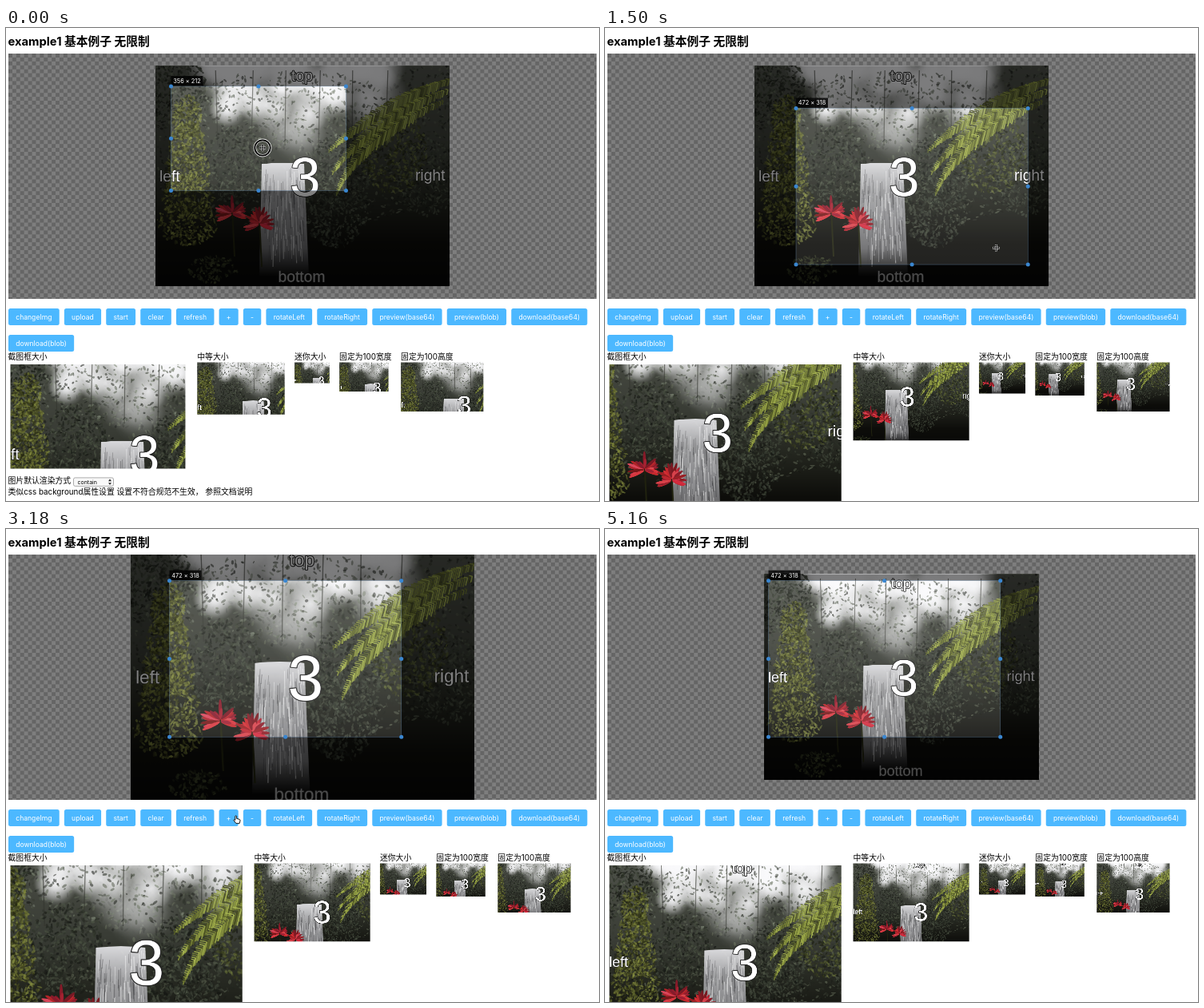
These frames come from a looping animation (742 by 592 pixels, 5220 ms). An HTML page with a canvas:

```html
<!DOCTYPE html>
<html lang="zh-CN">
<head>
<meta charset="utf-8">
<style>
html, body { margin: 0; width: 100%; height: 100%; overflow: hidden; background: #fff; }
canvas { display: block; }
</style>
</head>
<body>
<canvas id="stage" width="742" height="592"></canvas>
<script>
const LOOP = 5220, STEP = 60, SCALE = 0.615;
const VIEW = { x: 3, y: 32, w: 736, h: 307 };
const PHOTO = { w: 368, h: 276 };
const SANS = 'Inter, "Noto Sans CJK SC", "Noto Sans CJK", sans-serif';
const ctx = document.getElementById('stage').getContext('2d');

let seed = 11;
const rnd = () => (seed = (seed * 16807) % 2147483647) / 2147483647;
const between = (a, b) => a + (b - a) * rnd();
const clamp = (v, lo, hi) => Math.min(hi, Math.max(lo, v));

function layer(w, h, k, paint) {
  const c = document.createElement('canvas');
  c.width = w * k;
  c.height = h * k;
  const g = c.getContext('2d');
  g.scale(k, k);
  paint(g);
  return c;
}

function text(g, s, x, y, size, color = '#000', weight = 400, align = 'left') {
  g.font = `${weight} ${size}px ${SANS}`;
  g.fillStyle = color;
  g.textAlign = align;
  g.fillText(s, x, y);
}

function roundBox(g, x, y, w, h, r, fill, stroke) {
  g.beginPath();
  g.roundRect(x, y, w, h, r);
  g.fillStyle = fill;
  g.fill();
  if (stroke) {
    g.strokeStyle = stroke;
    g.stroke();
  }
}

function clipTo(g, r) {
  g.save();
  g.beginPath();
  g.rect(r.x, r.y, r.w, r.h);
  g.clip();
}

function line(g, x0, y0, x1, y1, width, color) {
  g.lineWidth = width;
  g.strokeStyle = color;
  g.beginPath();
  g.moveTo(x0, y0);
  g.lineTo(x1, y1);
  g.stroke();
}

// ---- photo ----
function ellipse(g, x, y, rx, ry, turn, fill) {
  g.fillStyle = fill;
  g.beginPath();
  g.ellipse(x, y, rx, ry, turn, 0, 7);
  g.fill();
}

function gradient(g, y0, y1, colors) {
  const f = g.createLinearGradient(0, y0, 0, y1);
  colors.forEach((c, i) => f.addColorStop(i / (colors.length - 1), c));
  return f;
}

function glow(g, x, y, r, alpha) {
  const f = g.createRadialGradient(x, y, 0, x, y, r);
  f.addColorStop(0, `rgba(250,250,252,${alpha})`);
  f.addColorStop(1, 'rgba(250,250,252,0)');
  ellipse(g, x, y, r, r, 0, f);
}

function leaves(g, n, x, y, rx, ry, tint, lo, hi) {
  for (let i = 0; i < n; i++) {
    const a = rnd() * 6.283, d = Math.sqrt(rnd());
    ellipse(g, x + rx * d * Math.cos(a), y + ry * d * Math.sin(a), between(1, 3.2), between(0.6, 1.6),
      rnd() * 3, `hsla(${tint},${between(lo, hi)}%,.6)`);
  }
}

function frond(g, x0, y0, cx, cy, x1, y1) {
  for (let u = 0; u <= 1; u += 0.014) {
    const v = 1 - u;
    const x = v * v * x0 + 2 * u * v * cx + u * u * x1;
    const y = v * v * y0 + 2 * u * v * cy + u * u * y1;
    const len = 17 * Math.sin(0.4 + u * 2.5) * between(0.7, 1.1);
    const color = `hsl(68,40%,${between(22, 52)}%)`;
    line(g, x, y, x - len * 0.5, y - len * 0.1, 1.2, color);
    line(g, x, y, x - len * 0.25, y + len, 1.4, color);
  }
}

function flower(g, x, y, r) {
  line(g, x, y, x + 3, y + 60, 2, '#20220f');
  for (let i = 0; i < 34; i++) {
    const a = between(-3.6, 0.4), d = r * between(0.5, 1.1);
    ellipse(g, x + d * 0.55 * Math.cos(a), y + 6 + d * 0.65 * Math.sin(a), d * 0.5, 1.9, a,
      `hsl(${between(350, 360)},66%,${between(28, 58)}%)`);
  }
}

function waterfall(g) {
  g.fillStyle = gradient(g, 122, 264, ['rgba(225,225,228,.95)', 'rgba(190,190,194,.8)',
    'rgba(175,175,180,.75)', 'rgba(165,165,170,.6)', 'rgba(150,150,156,0)']);
  g.beginPath();
  g.moveTo(133, 123);
  g.quadraticCurveTo(160, 120, 186, 123);
  g.lineTo(192, 264);
  g.lineTo(130, 264);
  g.fill();
  for (let i = 0; i < 150; i++) {
    const x = between(134, 185), y = between(124, 225);
    line(g, x, y, x + (x - 158) * 0.05, y + between(8, 30), between(0.5, 1.2),
      i % 2 ? 'rgba(255,255,255,.45)' : 'rgba(45,45,48,.35)');
  }
}

function word(g, s, x, y, size, edge, fill = '#fff') {
  g.font = `${size}px "Liberation Sans", Arial, sans-serif`;
  g.lineJoin = 'round';
  g.lineWidth = edge;
  g.strokeStyle = '#222';
  g.strokeText(s, x, y);
  g.fillStyle = fill;
  g.fillText(s, x, y);
}

function paintPhoto(g) {
  g.fillStyle = gradient(g, 0, PHOTO.h, ['#50534c', '#44473f', '#393c35', '#24261f', '#0d0d0a', '#060606']);
  g.fillRect(0, 0, PHOTO.w, PHOTO.h);
  leaves(g, 2600, 184, 75, 230, 130, '85,10%', 6, 40);

  // sky breaking through the canopy
  for (let i = 0; i < 75; i++) glow(g, between(62, 285), 62 * rnd() ** 2, between(14, 34), 0.75);
  for (let i = 0; i < 14; i++) glow(g, between(125, 215), between(50, 95), 30, 0.16);
  leaves(g, 420, 172, 52, 135, 46, '90,7%', 12, 52);
  for (let x = 78; x < 290; x += 42) line(g, x + between(-4, 4), 6, x, 100, 1.2, 'rgba(50,52,46,.6)');

  leaves(g, 500, 22, 30, 42, 50, '90,12%', 5, 26);
  for (const [x, y] of [[100, 125], [235, 130], [225, 180], [340, 140]])
    leaves(g, 520, x, y, 40, 48, '90,10%', 7, 32);
  for (let i = 0; i < 5; i++) leaves(g, 330, 40, 65 + i * 33, 18 + i * 5, 28, '66,38%', 8, 44);
  leaves(g, 500, 298, 108, 42, 52, '70,32%', 8, 38);
  leaves(g, 130, 72, 255, 30, 17, '75,25%', 8, 26);
  for (let i = 0; i < 3; i++)
    frond(g, 372 - 6 * i, 16 + 14 * i, 290 - 16 * i, 38 + 22 * i, 217 + 5 * i, 106 + 27 * i);

  waterfall(g);
  flower(g, 96, 179, 20);
  flower(g, 130, 192, 18);

  word(g, '3', 168, 163, 69, 2);
  word(g, 'left', 5, 145, 19.3, 1);
  word(g, 'right', 325, 143.5, 19.3, 1);
  word(g, 'top', 170, 19, 19.3, 1.8);
  word(g, 'bottom', 153.5, 270.5, 19.3, 1.6, '#999');
}

// ---- fixed page parts ----
function button(g, label, x, y) {
  g.font = `8.61px ${SANS}`;
  const w = g.measureText(label).width + 30 * SCALE;
  roundBox(g, x, y, w, 21, 2.5, '#4cb8ff');
  text(g, label, x + w / 2, y + 13.5, 8.61, '#fff', 400, 'center');
  return x + w + 10 * SCALE;
}

function paintPage(g) {
  g.fillStyle = '#fff';
  g.fillRect(0, 0, 742, 592);
  text(g, 'example1 基本例子 无限制', 2.5, 22, 14.76, '#000', 700);

  clipTo(g, VIEW);
  g.fillStyle = '#7e7e7e';
  g.fillRect(VIEW.x, VIEW.y, VIEW.w, VIEW.h);
  g.fillStyle = '#656565';
  const cell = 8 * SCALE;
  for (let r = 0; r * cell < VIEW.h; r++)
    for (let c = r % 2; c * cell < VIEW.w; c += 2)
      g.fillRect(VIEW.x + c * cell, VIEW.y + r * cell, cell, cell);
  g.restore();

  ['changeImg', 'upload', 'start', 'clear', 'refresh', '+', '-', 'rotateLeft', 'rotateRight',
    'preview(base64)', 'preview(blob)', 'download(base64)']
    .reduce((x, label) => button(g, label, x, 351), 3);
  button(g, 'download(blob)', 3, 384);
}

const photo = layer(PHOTO.w, PHOTO.h, 2, paintPhoto);
const page = layer(742, 592, 1, paintPage);

// ---- motion ----
// Pointer travel; a drag also shifts or resizes the crop box.
const MOVES = [
  { from: 0, to: 660, dx: 32.5, dy: 27.5, drag: 'shift' },
  { from: 660, to: 1080, dx: 107.5, dy: 58.5 },
  { from: 1200, to: 1440, dx: 71.3, dy: 65.2, drag: 'resize' },
  { from: 1440, to: 1560, dx: -86, dy: -52 },
  { from: 1560, to: 1840, dx: -34.5, dy: -35.8, drag: 'shift' },
  { from: 1860, to: 2460, dx: -123, dy: 150.5 },
  { from: 3200, to: 3310, dx: 27, dy: 3 },
  { from: 4440, to: 4860, dx: 84, dy: -141 },
  { from: 4860, to: 5100, dx: -70, dy: 390 },
];
const ZOOM_IN = { from: 2700, every: 90, clicks: 5 };
const ZOOM_OUT = { from: 3320, every: 140, clicks: 7 };

function travel(t, x, y, accept) {
  for (const m of MOVES.filter(accept)) {
    const u = clamp((t - m.from) / (m.to - m.from), 0, 1), e = u * u * (3 - 2 * u);
    x += m.dx * e;
    y += m.dy * e;
  }
  return [x, y];
}

const clicked = (z, t) => clamp(Math.floor((t - z.from) / z.every) + 1, 0, z.clicks);
const sinceClick = (z, t) => {
  const n = clicked(z, t);
  return n ? t - z.from - (n - 1) * z.every : Infinity;
};

// ---- moving parts ----
function drawCropper(img, box) {
  const drawImg = () => ctx.drawImage(photo, img.x, img.y, img.w, img.h);
  clipTo(ctx, VIEW);
  drawImg();
  ctx.fillStyle = 'rgba(0,0,0,.5)';
  ctx.fillRect(img.x, img.y, img.w, img.h);
  clipTo(ctx, box);
  drawImg();
  ctx.fillStyle = 'rgba(255,255,255,.1)';
  ctx.fillRect(box.x, box.y, box.w, box.h);
  ctx.restore();
  ctx.restore();

  ctx.strokeStyle = 'rgba(130,170,210,.5)';
  ctx.lineWidth = 0.6;
  ctx.strokeRect(box.x, box.y, box.w, box.h);
  ctx.fillStyle = 'rgba(0,0,0,.8)';
  ctx.fillRect(box.x, box.y - 13, 40, 12.3);
  text(ctx, `${Math.round(box.w / SCALE)} × ${Math.round(box.h / SCALE)}`,
    box.x + 20, box.y - 4.2, 7.38, '#fff', 400, 'center');
  for (let i = 0; i < 9; i++)
    if (i !== 4)
      ellipse(ctx, box.x + box.w * (i % 3) / 2, box.y + box.h * Math.floor(i / 3) / 2, 2.5, 2.5, 0, '#3a86d0');
}

function preview(label, labelX, x, y, k, img, box) {
  text(ctx, label, labelX, 415.3, 9.84);
  clipTo(ctx, { x, y, w: box.w * k, h: box.h * k });
  ctx.drawImage(photo, x + (img.x - box.x) * k, y + (img.y - box.y) * k, img.w * k, img.h * k);
  ctx.restore();
}

function drawPreviews(img, box) {
  const put = (label, x, k) => preview(label, x, x, 418.5, k, img, box);
  const gap = 20 * SCALE, side = 100 * SCALE;
  preview('截图框大小', 2.5, 5.5, 421, 1, img, box);
  let x = box.w + 20.3;
  put('中等大小', x, 0.5);
  x += box.w * 0.5 + gap;
  put('迷你大小', x, 0.2);
  x += box.w * 0.2 + gap;
  put('固定为100宽度', x, side / box.w);
  put('固定为100高度', x + 77, side / box.h);
}

function drawFooter(y) {
  text(ctx, '图片默认渲染方式', 2.5, y + 19, 9.84);
  ctx.lineWidth = 0.7;
  roundBox(ctx, 84.5, y + 11.5, 50, 10.5, 2, '#f8f8f8', '#8a8a8a');
  text(ctx, 'contain', 89.5, y + 19.2, 7);
  ctx.fillStyle = '#222';
  for (const d of [-1, 1]) {
    ctx.beginPath();
    ctx.moveTo(128, y + 16.8 + d);
    ctx.lineTo(132, y + 16.8 + d);
    ctx.lineTo(130, y + 16.8 + d * 3.6);
    ctx.fill();
  }
  text(ctx, '类似css background属性设置 设置不符合规范不生效， 参照文档说明', 2.5, y + 33, 9.84);
}

function drawRing(x, y, r) {
  for (const [w, c] of [[3.4, 'rgba(255,255,255,.85)'], [1.8, '#000']]) {
    ctx.lineWidth = w;
    ctx.strokeStyle = c;
    ctx.beginPath();
    ctx.arc(x, y, r, 0, 7);
    ctx.stroke();
  }
}

function drawPointer(x, y) {
  ctx.save();
  ctx.translate(x, y);
  ctx.lineJoin = 'round';
  if (y < VIEW.y + VIEW.h) {
    for (const [w, c] of [[2.6, '#fff'], [1, '#000']])
      for (let i = 0; i < 4; i++) {
        line(ctx, 0, 0, 0, -4, w, c);
        line(ctx, -1.2, -2.8, 1.2, -2.8, w, c);
        ctx.rotate(Math.PI / 2);
      }
  } else {
    const hand = y > 351 && y < 372;
    const p = new Path2D(hand
      ? 'M-2 -4.5q1-1 1.8 0v3l3.6 1q1 .4.8 1.6l-.8 3.4h-4.4l-3-4q.2-1.4 2 0z'
      : 'M0 0v9l2-2 1.5 3 1.3-.6-1.4-3H6.5z');
    ctx.fillStyle = hand ? '#fff' : '#000';
    ctx.strokeStyle = hand ? '#000' : '#fff';
    ctx.lineWidth = 0.9;
    ctx.fill(p);
    ctx.stroke(p);
  }
  ctx.restore();
}

function draw(now) {
  const t = Math.floor(now % LOOP / STEP) * STEP;
  const [x, y] = travel(t, 206.5, 73, m => m.drag === 'shift');
  const [bw, bh] = travel(t, 356 * SCALE, 212 * SCALE, m => m.drag === 'resize');
  const box = { x, y, w: bw, h: bh };
  const w = PHOTO.w + 20 * SCALE * (clicked(ZOOM_IN, t) - clicked(ZOOM_OUT, t)), h = w * 0.75;
  const img = { x: 371 - w / 2, y: 185.2 - h / 2, w, h };

  ctx.drawImage(page, 0, 0);
  drawCropper(img, box);
  drawPreviews(img, box);
  drawFooter(421 + box.h);

  const [px, py] = travel(t, 321, 150, () => true);
  const age = Math.min(sinceClick(ZOOM_IN, t), sinceClick(ZOOM_OUT, t));
  if (age < 115) drawRing(px - 1, py - 3, 10 + 6 * Math.min(1, age / 60));
  else if (MOVES.some(m => m.drag && t >= m.from && t <= m.to)) drawRing(px, py, 9.7);
  drawPointer(px, py);
}

const start = performance.now();
(function loop() {
  draw(performance.now() - start);
  requestAnimationFrame(loop);
})();
</script>
</body>
</html>
```
